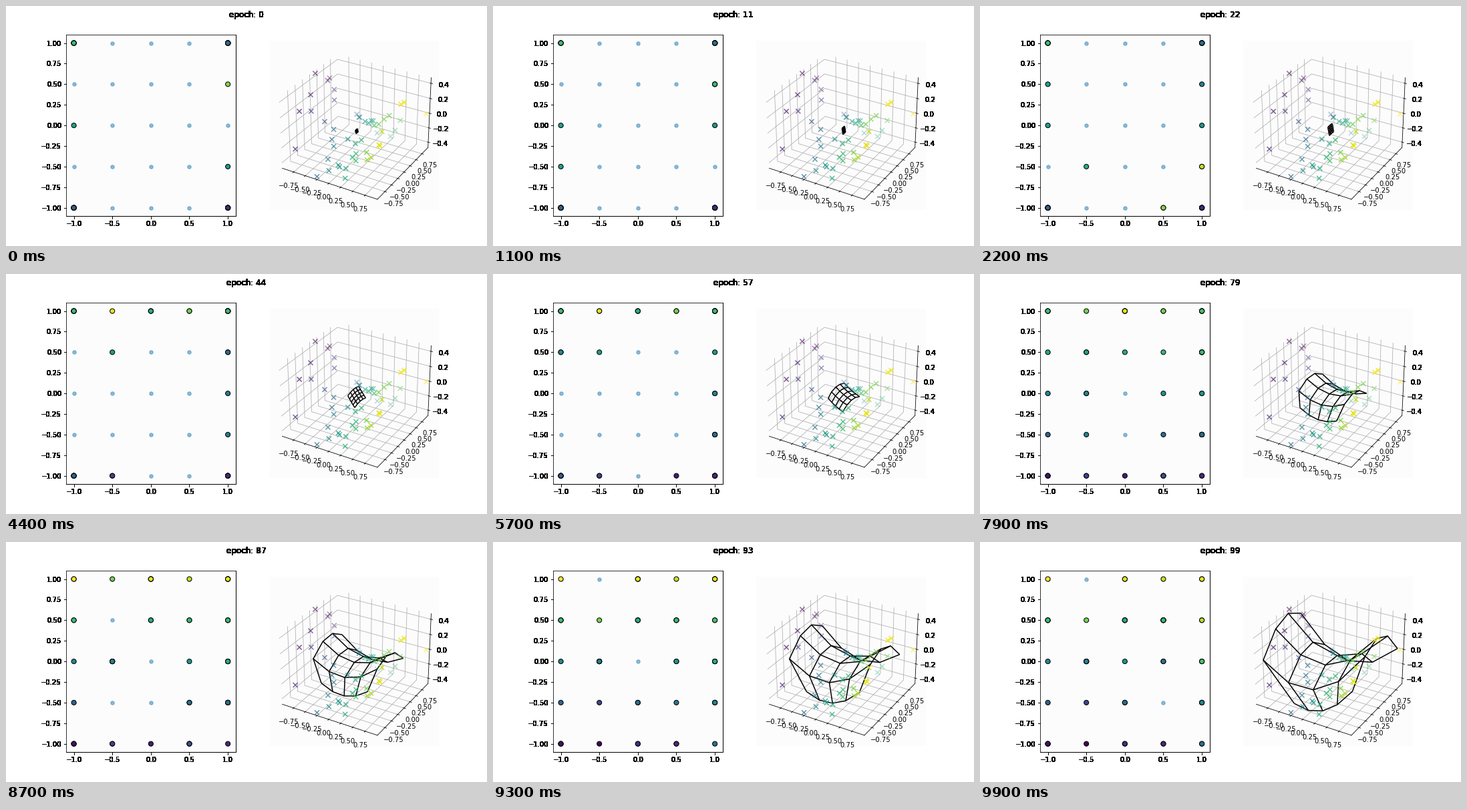
Write a matplotlib script that moves like this. It is 720 px wide and 360 px high and loops after 10000 ms.

```python
import numpy as np
import matplotlib.pyplot as plt
from matplotlib.animation import FuncAnimation
from mpl_toolkits.mplot3d.art3d import Line3DCollection

FRAMES = 100
PAPER = "#fcfcfc"
plt.rcParams["font.family"] = "DejaVu Sans"


def saddle(x, y):
    return (x**2 - y**2) / 2


# Training samples on the saddle
x, y = np.random.RandomState(0).uniform(-1, 1, (2, 50))
samples = np.column_stack([x, y, saddle(x, y)])

# Map units on a 5 x 5 lattice, top row first
lattice = np.linspace(-1, 1, 5)
units = np.array([(a, b) for b in lattice[::-1] for a in lattice])


def sheet(t):
    """Unit weights: a small tilted sheet that unfolds over the saddle."""
    a, b = units.T
    # One edge slides along the border and turns the corner
    a = a + 0.45 * t**4 * (1 - b) / 2
    over = np.maximum(a - 1, 0)
    x = (0.01 + 0.92 * t**3.3) * (b + 1.6 * over)
    y = -(0.04 + 0.85 * t**2) * np.minimum(a, 1)
    drop = (1 - t) * (0.11 + (0.02 + 0.22 * t) * b)
    return np.column_stack([x, y, saddle(x, y) - drop])


def winners(weights):
    gaps = samples[:, None] - weights[None]
    return units[(gaps**2).sum(axis=2).argmin(axis=1)]


def hard(im, dpi):
    """Make every touched pixel solid black."""
    im[..., :3] = 0
    im[..., 3] = im[..., 3] > 0
    return im, 0, 0


fig = plt.figure(figsize=(10, 5), dpi=72, facecolor="white")
fig.subplots_adjust(left=0.125, right=0.9, bottom=0.125, top=0.88, wspace=0.2)
title = fig.suptitle("epoch: 0", fontsize=12)

flat = fig.add_subplot(121, facecolor=PAPER)
flat.set(xlim=(-1.1, 1.1), ylim=(-1.1, 1.1),
         xticks=lattice, yticks=np.linspace(-1, 1, 9))
flat.scatter(*units.T, s=30, color="C0", alpha=0.5)
hits = flat.scatter(*winners(sheet(0)).T, c=x, s=50, edgecolors="black",
                    linewidths=1, zorder=2)

space = fig.add_subplot(122, projection="3d", computed_zorder=False,
                        facecolor=PAPER)
space.scatter(*samples.T, c=x, s=50, marker="x", zorder=3)
mesh = Line3DCollection([np.zeros((2, 3))], colors="black", linewidths=1.5,
                        zorder=2)
space.add_collection3d(mesh)

low, high = samples.min(axis=0), samples.max(axis=0)
pad = (high - low) / 48
quarters = np.linspace(-0.75, 0.75, 7)
xlim, ylim, zlim = zip(low - pad, high + pad)
space.set(xlim=xlim, ylim=ylim, zlim=zlim, xticks=quarters, yticks=quarters,
          zticks=np.linspace(-0.4, 0.4, 5))
for axis in (space.xaxis, space.yaxis, space.zaxis):
    axis.set_pane_color(PAPER)

# Everything outside the panels has hard edges
outside = [title, flat.xaxis, flat.yaxis,
           flat.spines["right"], flat.spines["bottom"]]
outside += [tick.label1 for tick in space.zaxis.get_major_ticks()]
for artist in outside:
    artist.set_agg_filter(hard)


def draw(epoch):
    weights = sheet(epoch / (FRAMES - 1))
    title.set_text(f"epoch: {epoch}")
    hits.set_offsets(winners(weights))
    grid = weights.reshape(5, 5, 3)
    mesh.set_segments([*grid, *grid.transpose(1, 0, 2)])
    return title, hits, mesh


anim = FuncAnimation(fig, draw, frames=FRAMES, interval=100, repeat=True,
                     repeat_delay=0, blit=False)
plt.show()
```
